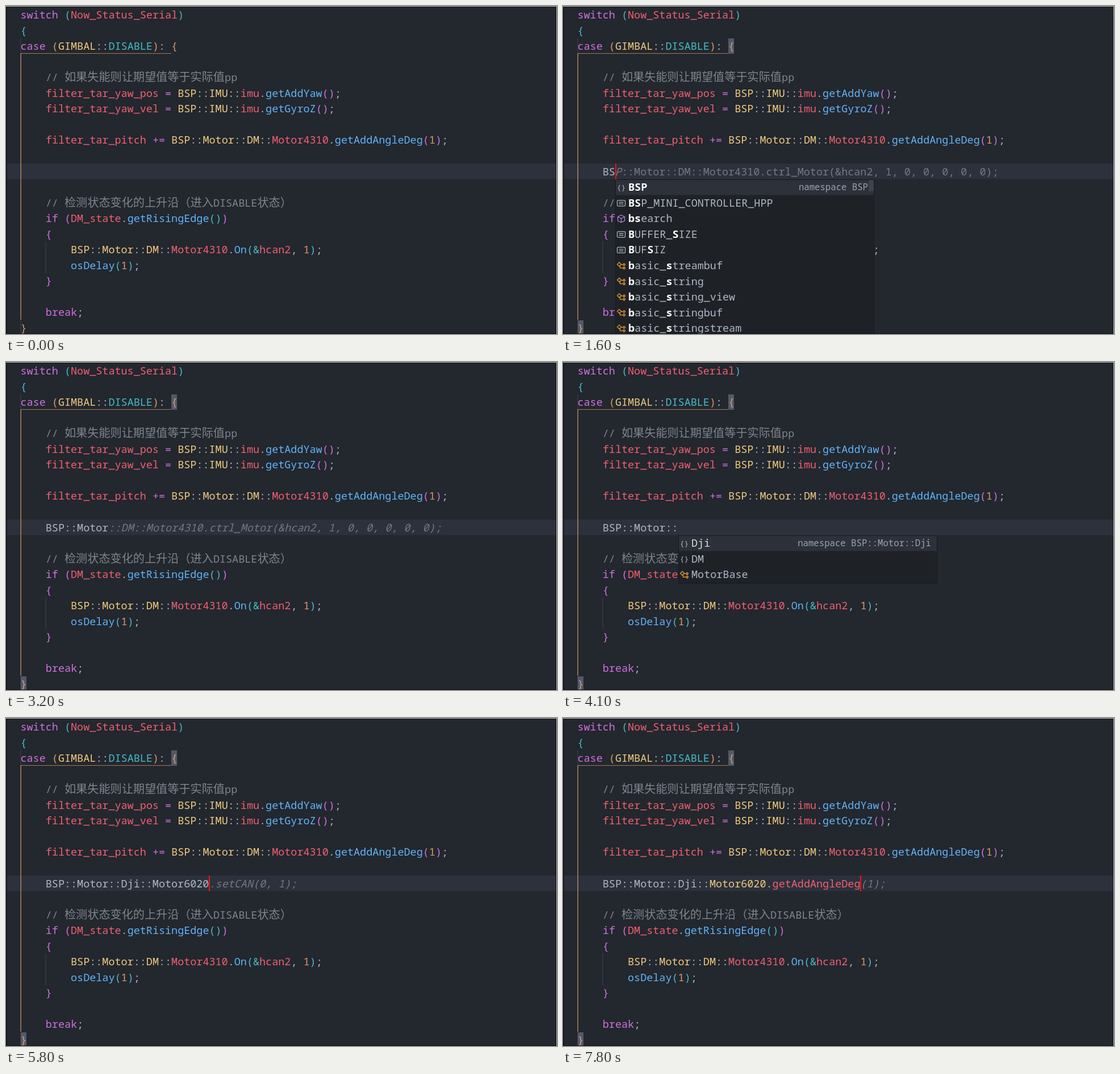
Write an HTML page with a canvas that moves like this. It is 970 by 577 pixels and loops after 8000 ms.

```html
<!DOCTYPE html>
<html lang="zh-CN">
<head>
<meta charset="utf-8">
<title>Code completion</title>
<style>
  html, body { margin: 0; width: 100%; height: 100%; overflow: hidden; background: #23272e; }
  canvas { display: block; }
</style>
</head>
<body>
<canvas id="stage" width="970" height="577"></canvas>
<script>
const ctx = document.getElementById('stage').getContext('2d');
const LOOP = 8000, CELL = 11.067, WIDE = 20.15, ROW = 27.55, LEFT = 25.5, LINE = 10;
const MONO = '"Noto Sans Mono", "DejaVu Sans Mono", monospace';
const CJK = '"Noto Sans CJK SC", "Noto Sans CJK", sans-serif';

// One-letter colour keys used as the first character of each text run.
const COLORS = {
  p: '#d070e0', r: '#f0606f', y: '#f0ca7c', b: '#5fb4fa', c: '#45bcc8',
  o: '#d89c66', g: '#b0b7c4', m: '#7f848e', h: '#737882', w: '#ffffff'
};

const CODE = [
  [0, 0, 'pswitch ', 'c(', 'rNow_Status_Serial', 'c)'],
  [1, 0, 'c{'],
  [2, 0, 'pcase ', 'o(', 'yGIMBAL', 'g::', 'cDISABLE', 'o)', 'g: ', 'o{'],
  [4, 4, 'm// 如果失能则让期望值等于实际值pp'],
  [5, 4, 'rfilter_tar_yaw_pos', 'p = ', 'yBSP', 'g::', 'yIMU', 'g::', 'rimu', 'g.', 'bgetAddYaw', 'p()', 'g;'],
  [6, 4, 'rfilter_tar_yaw_vel', 'p = ', 'yBSP', 'g::', 'yIMU', 'g::', 'rimu', 'g.', 'bgetGyroZ', 'p()', 'g;'],
  [8, 4, 'rfilter_tar_pitch', 'p += ', 'yBSP', 'g::', 'yMotor', 'g::', 'yDM', 'g::', 'rMotor4310', 'g.',
    'bgetAddAngleDeg', 'p(', 'o1', 'p)', 'g;'],
  [12, 4, 'm// 检测状态变化的上升沿（进入DISABLE状态）'],
  [13, 4, 'pif ', 'p(', 'rDM_state', 'g.', 'bgetRisingEdge', 'c()', 'p)'],
  [14, 4, 'p{'],
  [15, 8, 'yBSP', 'g::', 'yMotor', 'g::', 'yDM', 'g::', 'rMotor4310', 'g.', 'bOn', 'c(&', 'rhcan2', 'g, ', 'o1', 'c)', 'g;'],
  [16, 8, 'bosDelay', 'c(', 'o1', 'c)', 'g;'],
  [17, 4, 'p}'],
  [19, 4, 'pbreak', 'g;'],
  [20, 0, 'o}']
];

// Completion lists: icon, then label; * marks the matched letters.
const LISTS = {
  bs: { detail: 'namespace BSP', scroll: 20, items: [
    'n*B*S*P', 'k*B*SP_MINI_CONTROLLER_HPP', 'f*b*search', 'k*BUFFER_*SIZE', 'k*BUF*SIZ',
    'c*basic_*streambuf', 'c*basic_*string', 'c*basic_*string_view', 'c*basic_*stringbuf', 'c*basic_*stringstream'] },
  bsp: { detail: 'namespace BSP', scroll: 20, items: [
    'n*B*S*P', 'k*B*S*P_MINI_CONTROLLER_HPP', 'k*B*S*P_MOTOR_BASE_HPP', 'k*B*S*P_IMU_HPP', 'k*B*S*P_STATE_HPP',
    'c*basic_*string_*ptr', 'c*basic_*stream_*pos', 'c*basic_i*s*panstream', 'c*basic_o*s*panstream', 'c*basic_*s*panbuf'] },
  root: { detail: 'namespace BSP::Motor', items: ['nMotor', 'nIMU', 'nKey', 'nREMOTE', 'nState'] },
  motor: { detail: 'namespace BSP::Motor::DM', items: ['nDji', 'nDM', 'cMotorBase'] },
  dji: { detail: 'inline BSP::Motor::Dji::G…', cut: true, items: [
    'vMotor6020', 'vMotor3508', 'vMotor2006', 'cDjiMotorBase', 'cDjiFeedback', 'cGM2006', 'cGM3508', 'cGM6020'] },
  get: { detail: 'inline float BSP::Motor::M…', cut: true, items: [
    'f*g*e*tAddAngl…', 'f*g*e*tAddAngleRad', 'f*g*e*tAngleDeg', 'f*g*e*tAngleRad', 'f*g*e*tCurrent',
    'f*g*e*tLastAngleDeg', 'f*g*e*tRunTime', 'f*g*e*tTemperature', 'f*g*e*tTorque', 'f*g*e*tVelocityRads'] }
};

const CALL = '::DM::Motor4310.ctrl_Motor(&hcan2, 1, 0, 0, 0, 0, 0);';
const LONG = 'DM::Motor4310.ctrl_Motor(&hcan2, 1, 0.0f, 0.0f, 0.0f, 0.0f, 0);';
const MEMBER = ['gBSP::Motor::Dji::', 'yMotor6020', 'g.'];

// Each state of the edited line, held until the next start time.
const STATES = [
  { at: 0, text: [] },
  { at: 500, text: [], caret: 1 },
  { at: 1000, text: [] },
  { at: 1300, text: ['gB'], caret: 1 },
  { at: 1400, text: ['gBS'], caret: 1 },
  { at: 1500, text: ['gBS'], caret: 1, list: 'bs' },
  { at: 1600, text: ['gBS'], caret: 1, list: 'bs', ghost: 'P', tail: '::Motor' + CALL },
  { at: 1800, text: ['gBSP'], caret: 1, list: 'bsp', tail: '::Motor' + CALL },
  { at: 2000, text: ['gBSP::'], caret: 1, ghost: 'Motor' + CALL },
  { at: 2100, text: ['gBSP::'], caret: 1, list: 'root', ghost: 'Motor::' + LONG },
  { at: 2500, text: ['gBSP::'], list: 'root', ghost: 'Motor::' + LONG },
  { at: 2700, text: ['gBSP::Motor'], caret: 1 },
  { at: 2800, text: ['gBSP::Motor'], caret: 1, ghost: CALL },
  { at: 3200, text: ['gBSP::Motor'], ghost: CALL },
  { at: 3300, text: ['gBSP::Motor::'], caret: 1, ghost: CALL.slice(2) },
  { at: 3400, text: ['gBSP::Motor::'], caret: 1, list: 'motor', pick: 1, ghost: LONG },
  { at: 3800, text: ['gBSP::Motor::'], list: 'motor', pick: 1, ghost: LONG },
  { at: 4100, text: ['gBSP::Motor::'], list: 'motor', detail: 'namespace BSP::Motor::Dji' },
  { at: 4300, text: ['gBSP::Motor::Dji'], caret: 1 },
  { at: 4700, text: ['gBSP::Motor::Dji:'], caret: 1 },
  { at: 4800, text: ['gBSP::Motor::Dji::'], caret: 1 },
  { at: 4900, text: ['gBSP::Motor::Dji::'], caret: 1, list: 'dji' },
  { at: 5300, text: ['gBSP::Motor::Dji::'], list: 'dji' },
  { at: 5800, text: ['gBSP::Motor::Dji::Motor6020'], caret: 1, ghost: '.setCAN(0, 1);' },
  { at: 6200, text: ['gBSP::Motor::Dji::Motor6020'], ghost: '.setCAN(0, 1);' },
  { at: 6400, text: ['gBSP::Motor::Dji::Motor6020.'], caret: 1, ghost: 'setCAN(0, 1);' },
  { at: 6500, text: [...MEMBER, 'rg'], caret: 1 },
  { at: 6600, text: [...MEMBER, 'rge'], caret: 1 },
  { at: 6700, text: [...MEMBER, 'rget'], caret: 1 },
  { at: 6800, text: [...MEMBER, 'rget'], caret: 1, list: 'get' },
  { at: 7300, text: [...MEMBER, 'rget'], list: 'get' },
  { at: 7400, text: [...MEMBER, 'rget'], list: 'get', pick: 1 },
  { at: 7600, text: [...MEMBER, 'rget'], caret: 1, list: 'get' },
  { at: 7700, text: [...MEMBER, 'rgetAddAngleDeg'], caret: 1 },
  { at: 7800, text: [...MEMBER, 'rgetAddAngleDeg'], caret: 1, ghost: '(1);' }
];

const colX = col => LEFT + col * CELL;
const rowY = row => 22 + row * ROW;

function rect(x, y, w, h, color) {
  ctx.fillStyle = color;
  ctx.fillRect(x, y, w, h);
}

// Writes one string on the character grid and returns the x after it.
function write(str, x, y, color, style = '500') {
  ctx.fillStyle = color;
  for (const part of str.match(/[\u3000-\uffef]+|[^\u3000-\uffef]+/g) || []) {
    const wide = part.charCodeAt(0) >= 0x3000;
    ctx.font = wide ? `300 ${WIDE}px ${CJK}` : `${style} ${CELL / 0.6}px ${MONO}`;
    ctx.fillText(part, x, y);
    x += part.length * (wide ? WIDE : CELL);
  }
  return x;
}

function writeRuns(runs, x, y) {
  for (const run of runs) x = write(run.slice(1), x, y, COLORS[run[0]]);
  return x;
}

function path(points, close) {
  ctx.beginPath();
  points.forEach(([x, y]) => ctx.lineTo(x, y));
  if (close) ctx.closePath();
  ctx.stroke();
}

const ICONS = {
  n() {
    ctx.fillStyle = COLORS.g;
    ctx.font = `500 13px ${MONO}`;
    ctx.fillText('{}', -7.8, 4.5);
  },
  k() {
    ctx.strokeStyle = COLORS.g;
    ctx.beginPath();
    ctx.roundRect(-7, -5, 14, 10, 1.5);
    ctx.stroke();
    path([[-4, -1.5], [4, -1.5]]);
    path([[-4, 1.5], [4, 1.5]]);
  },
  f(picked) {
    ctx.strokeStyle = picked ? '#d7dae0' : '#b180d7';
    path([[0, -6.5], [6, -3.5], [6, 3.5], [0, 6.5], [-6, 3.5], [-6, -3.5]], true);
    path([[-6, -3.5], [0, -0.5], [6, -3.5]]);
    path([[0, -0.5], [0, 6.5]]);
  },
  c() {
    ctx.strokeStyle = '#ee9d28';
    path([[-3.5, -6], [0, -2.5], [-3.5, 1], [-7, -2.5]], true);
    path([[0, -2], [3, -2]]);
    path([[-2, 0], [-2, 4], [3, 4]]);
    path([[5, -4], [7, -2], [5, 0], [3, -2]], true);
    path([[5, 2], [7, 4], [5, 6], [3, 4]], true);
  },
  v() {
    ctx.strokeStyle = '#75beff';
    path([[-6, -1], [1, -5], [6, -2], [6, 2], [-1, 6], [-6, 3]], true);
    path([[-6, -1], [-1, 2], [6, -2]]);
  }
};

function drawIcon(kind, x, y, picked) {
  ctx.save();
  ctx.translate(x, y);
  ctx.lineWidth = 1.25;
  ICONS[kind](picked);
  ctx.restore();
}

function drawList(list, x, pick = 0, detail = list.detail) {
  const top = 305, width = 456, height = list.items.length * ROW + 2;
  rect(x, top, width, height, '#181a1f');
  rect(x + 1, top + 1, width - 2, height - 2, '#1e2227');
  rect(x + 1, top + 1 + pick * ROW, width - 2, ROW - 1, '#2c313a');
  list.items.forEach((item, i) => {
    const y = 325.2 + i * ROW, picked = i === pick;
    drawIcon(item[0], x + 10.5, y - 6, picked);
    let tx = x + 23;
    for (const [, star, ch] of item.slice(1).matchAll(/(\*?)(.)/g)) {
      tx = write(ch, tx, y, star ? COLORS.w : picked ? '#d7dae0' : COLORS.g, star ? 'bold' : '500');
    }
  });
  ctx.font = `15.67px ${MONO}`;
  ctx.fillStyle = '#9da4b0';
  ctx.textAlign = 'right';
  ctx.fillText(detail, x + (list.cut ? 437 : 445), 324.2 + pick * ROW);
  ctx.textAlign = 'left';
  if (list.scroll) rect(x + width - 10, top + 1, 9, list.scroll, '#3e434d');
}

function drawGuides() {
  const dim = '#3f4550';
  rect(25.5, 57, 1, 27, dim);
  rect(25.5, 553, 1, 23, dim);
  rect(69.5, 414, 1, 56, dim);
  rect(25.5, 83, 265.5, 1, '#a57d58');
  rect(25.5, 84, 1.2, 468, '#d19a66');
}

function drawFrame() {
  rect(0, 0, 970, 1, '#c9cacc');
  rect(0, 1, 970, 1, '#14161a');
  rect(0, 1, 1.5, 576, '#0d0f12');
  rect(0, 576, 970, 1, '#0d0f12');
  rect(968, 1, 1, 576, '#0d0f12');
  rect(969, 0, 1, 577, '#c9cacc');
}

function draw(t) {
  const s = STATES.findLast(state => state.at <= t);
  rect(0, 0, 970, 577, '#23272e');
  rect(1, 277, 967, 27.5, '#2c313c');
  drawGuides();
  if (t >= 600) {
    rect(291, 57, 10, 27, '#515a6b');
    rect(26, 553, 10, 23, '#515a6b');
  }
  for (const [row, col, ...runs] of CODE) writeRuns(runs, colX(col), rowY(row));

  const y = rowY(LINE), end = writeRuns(s.text, colX(4), y);
  const next = write(s.ghost || '', end, y, COLORS.h, 'italic');
  write(s.tail || '', next, y, COLORS.h);
  if (s.list) drawList(LISTS[s.list], Math.round(end + 0.4), s.pick, s.detail);
  if (s.caret) rect(Math.round(end - 0.3), 277, 2, 28, '#f01414');
  drawFrame();
}

function tick() {
  draw(performance.now() % LOOP);
  requestAnimationFrame(tick);
}
tick();
</script>
</body>
</html>
```
